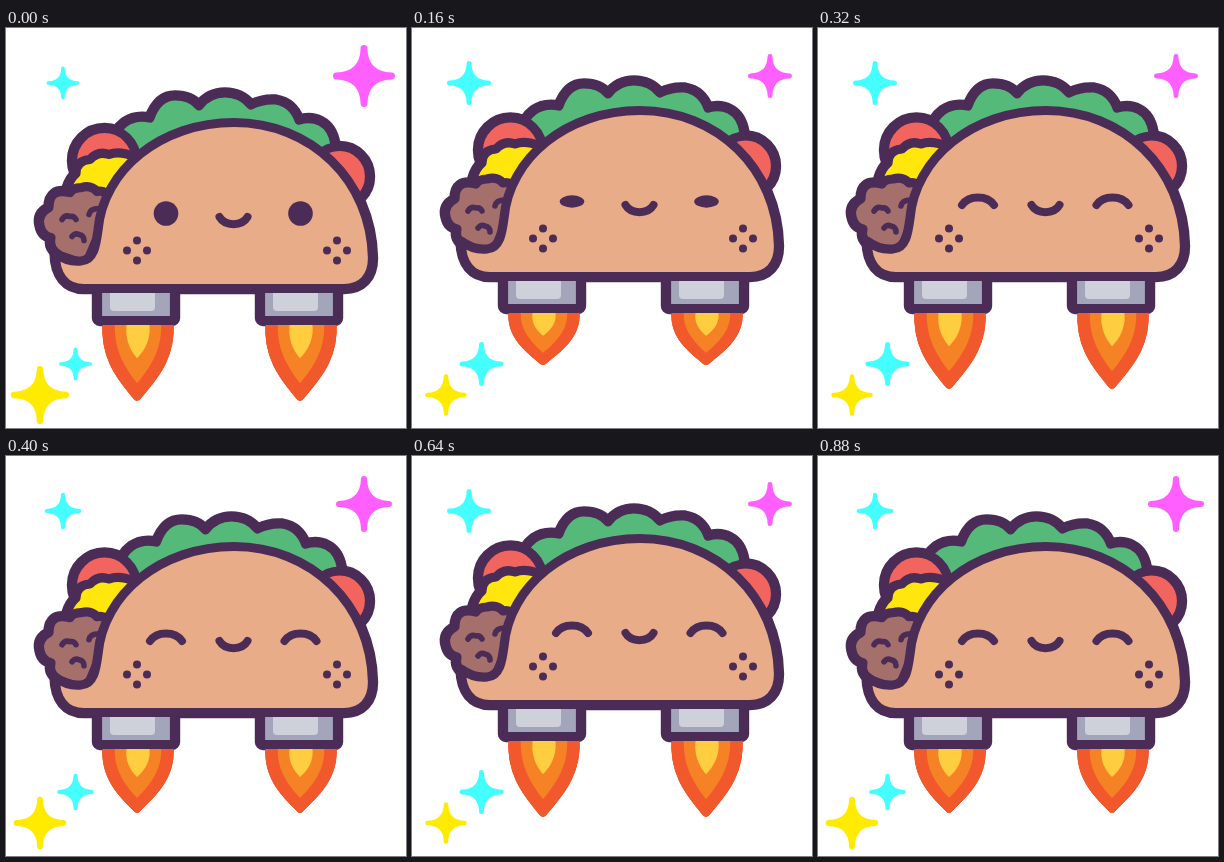
Animation, 400 px wide and 400 px high, one loop 960 ms. Source, as an HTML page:

```html
<!DOCTYPE html>
<html lang="en">
<head>
<meta charset="utf-8">
<title>Rocket taco</title>
<style>
  @property --i { syntax: "<number>"; inherits: true; initial-value: 0; }

  html, body { margin: 0; width: 100%; height: 100%; overflow: hidden; background: #fff; }

  /* --i counts twelve 80 ms steps; every pose is a cosine of it */
  svg {
    display: block; width: 100vw; height: 100vh;
    animation: tick 960ms steps(12, end) infinite;
    --w: cos(var(--i) * 60deg);
  }
  @keyframes tick { from { --i: 0; } to { --i: 12; } }

  .bob { transform: translateY(calc(4px + 8px * var(--w))); }
  .lag { transform: translateY(calc((var(--w) + .5) * var(--k) * -1px)); }
  .slide { transform: translateX(calc(3.5px * cos((var(--i) - 5) * 30deg))); }
  .flame {
    transform-origin: 0 285px;
    transform: scaleY(calc(1 + .1875 * cos(var(--i) * 90deg)));
  }
  .open {
    transform-origin: 0 173.5px;
    transform: scaleY(calc(1 - .25 * var(--i)));
    opacity: clamp(0, 3 - var(--i), 1);
  }
  .shut { opacity: clamp(0, var(--i) - 2, 1); }
  .star {
    transform: translate(var(--x), var(--y)) scale(calc(var(--m) + var(--v) * var(--w)));
    stroke-width: .22;
  }

  .ink { stroke: #4b2c57; stroke-width: var(--pen, 9.2px); }
  .rim { --pen: 11.4px; }
  .line { fill: none; stroke: #4b2c57; stroke-width: 8; }
  .thin { stroke-width: 5.6; }
  .dark { fill: #4b2c57; }
  svg * { stroke-linejoin: round; stroke-linecap: round; }
</style>
</head>
<body>
<svg viewBox="0 0 400 400">
  <defs>
    <path id="star" d="M0-.89Q.02-.02 .89 0Q.02 .02 0 .89Q-.02 .02-.89 0Q-.02-.02 0-.89Z"/>
    <g id="jet">
      <g class="flame">
        <path fill="#f1592d" stroke="#f1592d" d="M97 282C94 316 116 334 127 346Q131 351 135 346C146 334 170 316 167 282Z"/>
        <path fill="#f58225" d="M109 282C107 304 118 320 131 334C145 320 157 304 155 282Z"/>
        <path fill="#ffcd40" d="M121 282C118 296 124 306 131 313C139 306 146 296 143 282Z"/>
      </g>
      <rect class="ink" x="91.500" y="240" width="77" height="40.500" rx="2.500" fill="#a3a6ba"/>
      <path fill="#ced1da" d="M104 245H149V267Q149 271 145 271H108Q104 271 104 267Z"/>
    </g>
    <g id="dots" class="dark">
      <circle cx="131" cy="200.500" r="4"/>
      <circle cx="121" cy="210.500" r="4"/>
      <circle cx="141" cy="210.500" r="4"/>
      <circle cx="131" cy="220.500" r="4"/>
    </g>
    <g id="eye">
      <circle class="dark open" cx="160" cy="173.500" r="12.300"/>
      <path class="line shut" d="M144 177C151 167 169 167 176 177"/>
    </g>
    <g id="taco">
      <use href="#jet"/>
      <use href="#jet" x="163"/>

      <path class="ink slide" fill="#55b979" d="M107 108C112 84 128 74 147 78Q155 56 172 56Q188 56 196 66Q206 53 222 53Q238 53 248 65Q260 59 273 60Q290 63 296 80C310 76 328 80 332 104L300 160H130Z"/>
      <g class="lag ink" style="--k:1">
        <circle cx="333.500" cy="138" r="30" fill="#f2655f"/>
        <circle cx="98.500" cy="122" r="32" fill="#f2655f"/>
        <path fill="#ffe60d" d="M61 150Q64 140 70 135Q70 122 84 121Q92 112 103 116Q113 112 128 118L110 170H70Z"/>
      </g>
      <g class="lag" style="--k:2.3">
        <path class="ink" fill="#a5706c" d="M104 163Q100 153 91 155Q85 148 75 151Q67 151 64 156Q43 151 43 171Q31 177 34 189Q36 199 45 201Q42 212 54 219L80 228L96 190Z"/>
        <path class="line thin" d="M56 183q3-5 8-3q4-1 6 3M83 178q1-6 10-6M66 200q3-4 7-2q5 1 5 6"/>
      </g>

      <path class="ink" fill="#e9ac88" d="M49 213C57 219 66 222 75 221C88 220 90 205 92 190C97 130 155 82.500 228 82.500C305 82.500 365 140 366.500 218C366.500 237 356 248.500 338 248.500H78C60 248.500 49.500 236 49 213Z"/>

      <use href="#dots"/>
      <use href="#dots" x="200"/>
      <use href="#eye"/>
      <use href="#eye" x="134.500"/>
      <path class="line" d="M213.500 177C219 186.500 236 186.500 241.500 177"/>
    </g>
  </defs>

  <use href="#star" class="star" fill="#ff5fff" stroke="#ff5fff" style="--x:358px;--y:48px;--m:25;--v:6"/>
  <use href="#star" class="star" fill="#ffeb00" stroke="#ffeb00" style="--x:34px;--y:367px;--m:23.5;--v:5.5"/>
  <use href="#star" class="star" fill="#45ffff" stroke="#45ffff" style="--x:57px;--y:55px;--m:20.2;--v:-3.7"/>
  <use href="#star" class="star" fill="#45ffff" stroke="#45ffff" style="--x:69.500px;--y:336px;--m:20.2;--v:-3.7"/>

  <!-- a copy with a heavier pen lies beneath and thickens the outer rim -->
  <g class="bob">
    <use href="#taco" class="rim"/>
    <use href="#taco"/>
  </g>
</svg>
</body>
</html>
```
